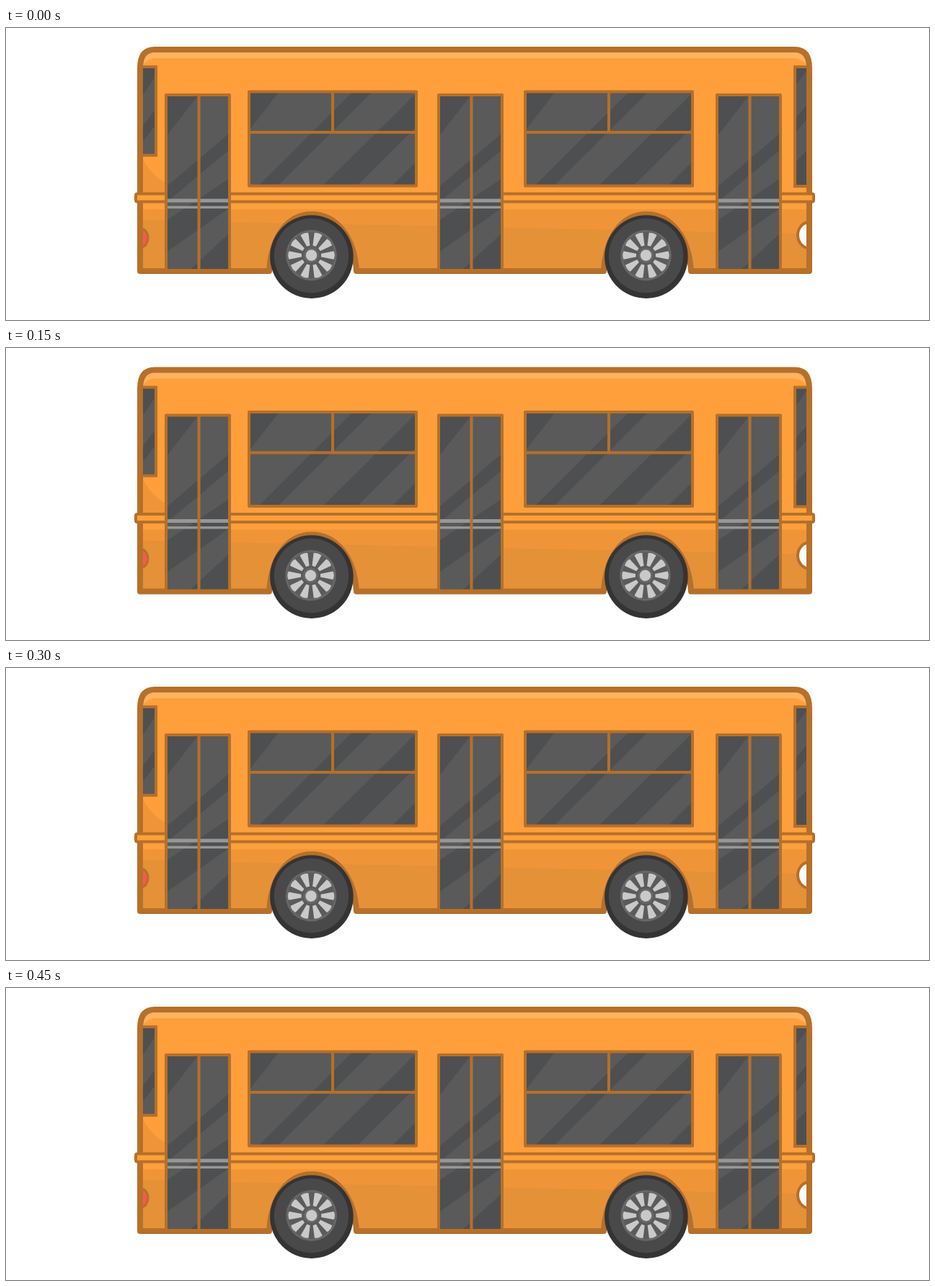
Animation of 1280 by 406 pixels, one loop 500 ms. Source, as an HTML page:

```html
<!DOCTYPE html>
<html lang="en">
<head>
<meta charset="utf-8">
<title>Bus</title>
<style>
html, body { margin: 0; width: 100%; height: 100%; overflow: hidden; background: #fff; }
svg { display: block; width: 100vw; height: 100vh; }
.line { fill: none; stroke: #b5702a; stroke-width: 4; }
.glass { fill: #5a5a5a; }
.shade { fill: #4e4f50; }
.rail { fill: #979797; }
</style>
</head>
<body>
<svg viewBox="0 0 1280 406">
  <defs>
    <path id="shell" d="M186 338V56Q186 30 206 30H1094Q1114 30 1114 56V338H950C947 290 922 259 888 259S832 290 829 338H486C483 290 458 259 424 259S368 290 365 338Z"/>
    <clipPath id="inside"><use href="#shell"/></clipPath>
    <clipPath id="pane"><rect width="232" height="131"/></clipPath>
    <g id="window">
      <rect class="glass" width="232" height="131"/>
      <path class="shade" clip-path="url(#pane)" d="M0 0H42L0 54ZM144 0H171L40 131H13ZM234 0V47L150 131H102ZM234 95V131H198Z"/>
      <path class="line" stroke-linejoin="round" d="M0 0H232V131H0ZM0 56.5H232M116 0V56.5"/>
    </g>
    <g id="door">
      <rect class="glass" width="88" height="244"/>
      <path class="shade" d="M0 0H45L0 58ZM88 53V76L0 150V128ZM88 116V157L0 219V175ZM88 192V244H32Z"/>
      <path class="rail" d="M0 144.5H88V149.5H0ZM0 154.5H88V158H0Z"/>
      <path class="line" stroke-linejoin="round" d="M0 0H88V244H0ZM45.5 0V244"/>
    </g>
  </defs>

  <g id="body">
    <g clip-path="url(#inside)">
      <rect x="180" y="26" width="940" height="316" fill="#ff9f3b"/>
      <path fill="#ffb260" d="M188 56Q190 32 208 32H1092Q1110 32 1112 56Q1106 42 1092 42H208Q194 42 188 56Z"/>
      <path fill="#f09537" d="M186 172Q196 202 224 217V232H186ZM186 252H1114V342H186Z"/>
      <path fill="#e59138" d="M186 267L1114 286V342H186Z"/>
      <g>
        <rect class="glass" x="188" y="54" width="20" height="123"/>
        <path class="shade" d="M188 54H208V66L188 96ZM208 112V134L188 160V138Z"/>
        <rect class="line" x="186" y="54" width="22" height="123"/>
        <rect class="glass" x="1094" y="54" width="20" height="166"/>
        <path class="shade" d="M1094 54H1114L1094 82ZM1114 104V124L1094 146V126ZM1114 166V220H1094V188Z"/>
        <rect class="line" x="1094" y="54" width="22" height="166"/>
      </g>
      <ellipse class="line" cx="188" cy="292" rx="9" ry="12.5" style="fill:#f9584f;stroke-width:3"/>
      <ellipse class="line" cx="1114" cy="288" rx="16" ry="18" style="fill:#fafafa"/>
    </g>
    <use href="#shell" class="line" style="stroke-width:8" stroke-linejoin="round"/>
    <rect class="line" x="180" y="230.5" width="940" height="11" rx="2" style="fill:#ffa03f"/>
    <use href="#window" x="337" y="88.5"/>
    <use href="#window" x="720" y="88.5"/>
    <use href="#door" x="222" y="93"/>
    <use href="#door" x="600" y="93"/>
    <use href="#door" x="986" y="93"/>
  </g>
  <g id="wheels"></g>
</svg>
<script>
const STEP = 50, STEPS = 10, SPOKES = 10;
const bounce = [0, 0.1, 0.6, 0.6, 0.2, 0, 0, 0, 0, 0];
const body = document.getElementById("body");
const wheels = document.getElementById("wheels");

const spoke = i =>
  `<path d="M-2.3 -13.5L-5.7 -31Q0 -33.6 5.7 -31L2.3 -13.5Z" transform="rotate(${(i + 0.5) * 360 / SPOKES})"/>`;

const wheel = x => `
  <g transform="translate(${x} 316.5)">
    <circle cx=".8" cy="1.6" r="57.8" fill="#343434"/>
    <circle r="51.7" cx=".4" fill="#494949"/>
    <g class="rim">
      <circle r="35.3" fill="#676767"/>
      <circle r="32.3" fill="#5b5b5b"/>
      <g fill="#c9c9c9">${Array.from({ length: SPOKES }, (_, i) => spoke(i)).join("")}</g>
      <circle r="9.2" fill="#c9c9c9" stroke="#676767" stroke-width="3"/>
    </g>
  </g>`;

wheels.innerHTML = wheel(423.1) + wheel(887.1);
const rims = document.querySelectorAll(".rim");

// The rim sits slightly off its axle, so it wobbles as it turns.
function draw(now) {
  const step = Math.floor(now / STEP) % STEPS;
  const turn = -360 / STEPS * step;
  body.setAttribute("transform", `translate(0 ${bounce[step]})`);
  for (const rim of rims)
    rim.setAttribute("transform", `rotate(${turn}) translate(.4 -.5)`);
}

const start = performance.now();
function tick() {
  draw(performance.now() - start);
  requestAnimationFrame(tick);
}
tick();
</script>
</body>
</html>
```
